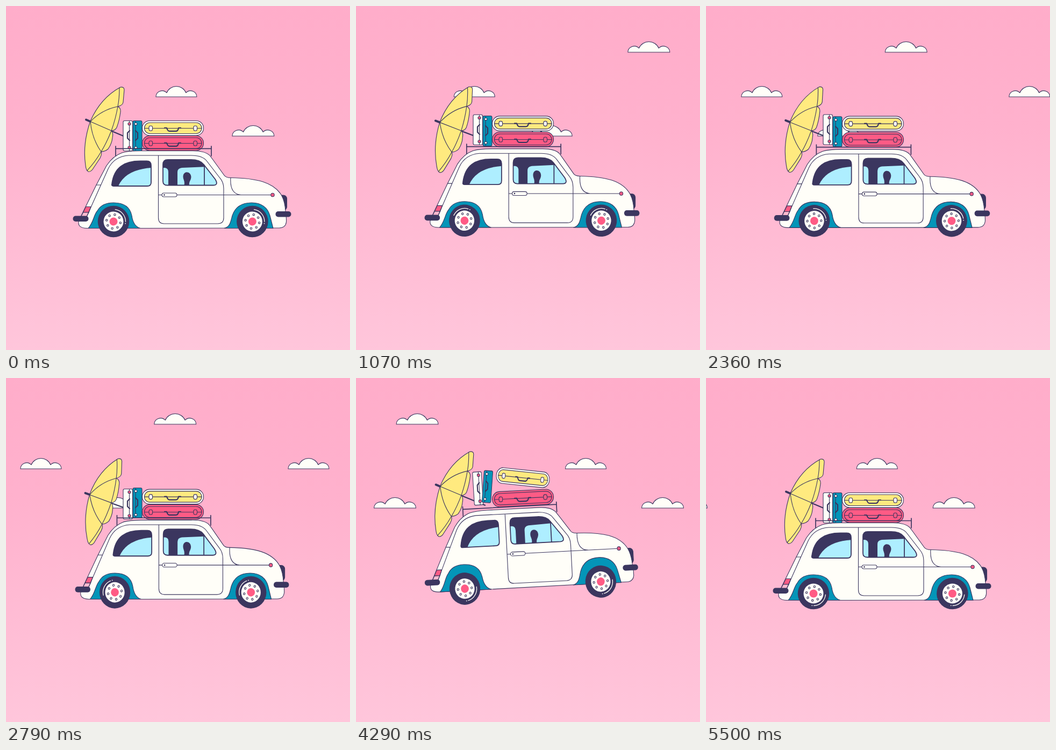
Recreate the animation shown at these times as an HTML page. Size 640 px wide and 640 px high, loop 5570 ms.

```html
<!DOCTYPE html>
<html lang="en">
<head>
<meta charset="utf-8">
<title>Road trip</title>
<style>
html, body { margin: 0; width: 100%; height: 100%; overflow: hidden; background: #ffb9d2; }
svg { display: block; width: 100%; height: 100%; }
.ln { stroke: #3b365f; stroke-width: 1.1; stroke-linejoin: round; stroke-linecap: round; }
.no { fill: none; }
.thick { stroke-width: 2.2; }
.navy { fill: #3b365f; }
.white { fill: #fffef8; }
.yellow { fill: #ffea7f; }
.red { fill: #ff5b85; }
.blue { fill: #0495b8; }
.glass { fill: #aeeeff; }
</style>
</head>
<body>
<svg viewBox="0 0 640 640">
  <defs>
    <linearGradient id="sky" x2="0" y2="1">
      <stop stop-color="#ffadca"/><stop offset=".35" stop-color="#ffb1cd"/><stop offset="1" stop-color="#ffc6db"/>
    </linearGradient>
    <path id="cloud" class="ln white" d="M0 19A11.5 11.5 0 0 1 20 11.500A19.500 19.500 0 0 1 56 11.500A11.500 11.500 0 0 1 76 19Z"/>
    <g id="wheelShape">
      <circle r="29.300" class="navy"/>
      <circle r="18.500" class="white"/>
      <circle r="7.500" class="red"/>
      <g id="bolts"></g>
      <path d="M3 -22.300A22.500 22.500 0 0 1 22.500 0" fill="none" stroke="#fffef8" stroke-width="1.300" stroke-linecap="round"/>
      <circle cx="22.200" cy="3.400" r=".9" class="white"/>
    </g>
    <clipPath id="rearGlass"><path d="M197 331C201 300 220 288.500 250 288.500H262Q270 288.500 270 297V328Q270 335 263 335H200Q196 335 197 331Z"/></clipPath>
    <clipPath id="sideGlass"><path d="M292 295Q292 286 301 286H344Q361 286 368 295L389 322Q396 333 386 333.500H300Q292 333.500 292 326Z"/></clipPath>
  </defs>
  <rect width="640" height="640" fill="url(#sky)"/>
  <g id="clouds"></g>

  <g id="umbrella" class="ln no">
    <path class="thick" d="M195 232L240 251"/>
    <path class="yellow" d="M213 151Q220 150 220 156L218 179Q217 185 208 187Q214 190 213 197Q211 213 206 226Q203 232 196 232Q200 236 198 245Q197 256 190 266Q184 271 177 271Q179 275 175 283L161 304Q157 309 153 308Q149 306 148 297Q142 257 157 214Q176 171 213 151Z"/>
    <path d="M211 152Q211 172 208 187Q204 210 196 232Q188 253 177 271Q166 290 151 306M157 215Q178 193 208 187M157 215L196 232M157 215Q160 247 177 271"/>
    <path stroke-width="4" d="M149 211.500L156 214.500"/>
  </g>

  <g id="white" class="ln">
    <rect class="white" x="218" y="213.500" width="17.500" height="56" rx="2.500"/>
    <path class="no" d="M229.500 214V269"/>
    <path class="no thick" d="M230 232L226 236V246L230 250"/>
    <rect class="red" x="227" y="217" width="5" height="4.500" rx="2"/>
    <rect class="red" x="227" y="261" width="5" height="4.500" rx="2"/>
  </g>
  <g id="blue" class="ln">
    <rect class="blue" x="236" y="213.500" width="17" height="56" rx="2.500"/>
    <path class="no" d="M241 214V269"/>
    <path class="no thick" d="M241 232L245 236V246L241 250"/>
    <rect class="white" x="239" y="217.500" width="5" height="4" rx="2"/>
    <rect class="white" x="239" y="261.500" width="5" height="4" rx="2"/>
  </g>
  <g id="red" class="ln"></g>
  <g id="yellow" class="ln"></g>

  <g id="car" class="ln">
    <path class="no" stroke-width="1.700" d="M204 261V279M382 261V279M204 265.500H382"/>
    <rect class="navy" x="507" y="352" width="15.500" height="28" rx="6.500"/>
    <path class="white" d="M150 413.500Q134 413 135 402Q136 396 140 390L168 333L187 297Q199 279 216 273Q228 269.500 250 269.500H345Q370 269 379 278L385 286L406 315Q409 319.500 418 319.500Q455 320 478 327Q503 335 513 353Q519 364 520 382Q522 392 521.500 402Q520 413 508 413L250 413.500Z"/>
    <path class="blue" d="M153 413.500C163 402 163 389 170 381C176 370 187 366 200 366C220 366 231 375 234 390C236 404 241 411 250 413.500Z"/>
    <path class="blue" d="M406 413.500C417 411 418 401 421 390C427 372 441 366 457 366C475 366 487 375 491 390L497 413.500Z"/>
    <path class="red" d="M148.500 373.500H158L154 384H143.500Z"/>
    <path fill="#ffb9cf" d="M143.500 384H154L150 392H139.500Z"/>
    <path class="no" d="M168 333H176.500M150 392L176.500 333L190 303Q201 280 228 278H345Q366 278 374 289L398 320Q405 328 405 340V394Q405 405 394 405H294Q283.500 405 283.500 394V278M283.500 351.500H494M418 319.500Q416 350 437 351.500"/>
    <g clip-path="url(#rearGlass)" stroke="none">
      <path class="navy" d="M190 280H280V340H190Z"/>
      <path class="glass" d="M207 340Q219 304 272 301V340Z"/>
    </g>
    <path class="no" stroke-width="1.800" d="M197 331C201 300 220 288.500 250 288.500H262Q270 288.500 270 297V328Q270 335 263 335H200Q196 335 197 331Z"/>
    <g clip-path="url(#sideGlass)" stroke="none">
      <path class="navy" d="M290 280H400V340H290Z"/>
      <path class="glass" d="M290 301H296Q302 302 302 309V340H290ZM319 340V309Q319 302 327 301L375 299L400 330V340Z"/>
      <path class="navy" d="M331 335C334 326 329 323 329.500 317C330 306 344 307 344.500 318C344 326 340 325 341 335Z"/>
    </g>
    <path class="no" stroke-width="1.800" d="M292 295Q292 286 301 286H344Q361 286 368 295L389 322Q396 333 386 333.500H300Q292 333.500 292 326ZM369 296V333"/>
    <rect class="white" x="290" y="348" width="28" height="7" rx="3.500"/>
    <circle class="navy" cx="294.500" cy="351.500" r=".8"/>
    <circle class="red" cx="496" cy="351.500" r="3.200"/>
    <g stroke="none">
      <g class="wheel"><use href="#wheelShape"/></g>
      <g class="wheel"><use href="#wheelShape"/></g>
      <rect class="navy" x="124.500" y="390.500" width="29" height="10.500" rx="5"/>
      <rect class="navy" x="501.500" y="382" width="29" height="10.500" rx="5"/>
    </g>
  </g>
</svg>
<script>
const LOOP = 5570, BOUNCE = 619;
const $ = id => document.getElementById(id);
const rad = Math.PI / 180;

// Value at time t on a line through [time, value, time, value, ...]
function track(t, keys) {
  if (t <= keys[0]) return keys[1];
  for (let i = 2; i < keys.length; i += 2) {
    if (t <= keys[i]) {
      const p = (t - keys[i - 2]) / (keys[i] - keys[i - 2]);
      return keys[i - 1] + (keys[i + 1] - keys[i - 1]) * p;
    }
  }
  return keys[keys.length - 1];
}

function pose(el, cx, cy, dx, dy, angle = 0, sx = 1, sy = 1) {
  el.setAttribute("transform",
    `translate(${cx + dx} ${cy + dy}) rotate(${angle}) scale(${sx} ${sy}) translate(${-cx} ${-cy})`);
}

function flatCase(id, y, shell) {
  const lock = x => `<rect class="${shell}" x="${x}" y="${y + 9.5}" width="6.5" height="9" rx="2.8"/>`;
  $(id).innerHTML =
    `<rect class="${shell}" x="253.5" y="${y}" width="114" height="27.5" rx="13.7"/>
     <rect class="${id}" x="257.500" y="${y + 3.5}" width="106.500" height="20.500" rx="10.2"/>
     <path class="no" d="M257.500 ${y + 14}H364"/>
     <path class="no thick" d="M295 ${y + 13.5}h4q2 6 5 6h12q4 0 5 -6h4"/>` + lock(266) + lock(349);
}
flatCase("yellow", 213.5, "white");
flatCase("red", 241.5, "red");

for (let i = 0; i < 8; i++) {
  const a = (i * 45 + 10) * rad;
  $("bolts").innerHTML +=
    `<circle class="ln white" cx="${13 * Math.cos(a)}" cy="${13 * Math.sin(a)}" r="1.700"/>`;
}

// x and y at the start, width scale, speed in px per ms
const clouds = [[279, 150, 1, .0903], [777, 150, 1, .0903],
  [421, 223, 1.025, .0903], [919, 223, 1.025, .0903], [649.2, 67, 1.025, .1338]];
$("clouds").innerHTML = clouds.map(() => '<use href="#cloud"/>').join("");

// centre, hop height, hop lag, jump height, early share of the jump, tilt, stretch x and y
const cases = [
  { id: "yellow", x: 310.5, y: 227, hop: 6, lag: .45, jump: 15, early: .05, tilt: 6, sx: -.13, sy: .06 },
  { id: "red", x: 310.5, y: 255, hop: 4, lag: .45, jump: 5, early: 0, tilt: -2.9, sx: 0, sy: .03 },
  { id: "white", x: 226.7, y: 241.5, hop: 9.5, lag: .45, jump: 13.5, early: .05, tilt: -3.5, sx: -.06, sy: .1 },
  { id: "blue", x: 244.5, y: 241.5, hop: 5, lag: .25, jump: 16, early: .44, tilt: 4, sx: -.05, sy: .06 }
];
const wheels = document.querySelectorAll(".wheel");

function draw(t) {
  clouds.forEach(([x, y, size, speed], i) =>
    $("clouds").children[i].setAttribute("transform", `translate(${x - speed * t} ${y}) scale(${size} 1)`));

  const bouncing = t < 5 * BOUNCE;
  const stretch = bouncing ? Math.abs(Math.sin(Math.PI * t / BOUNCE))
    : track(t, [3095, 0, 3500, .6, 4290, 1, 4570, .6, 4690, -1, 4900, .3, 5140, 0]);
  const lift = track(t, [3095, 0, 3300, -3, 3430, -9, 3500, -13, 3900, -21, 4290, -22.5,
    4570, -12, 4690, 3, 4850, 1, 5140, 0]) - 2 * stretch;
  const angle = track(t, [3200, 0, 3500, -1.35, 3900, -2.6, 4290, -3, 4570, -1.2, 4690, 0]);
  const drop = track(t, [3300, 0, 3500, 3, 4290, 9, 4570, 5, 4690, 0]);
  pose($("car"), 327, 413.5, 0, lift, angle, 1 - .02 * stretch, 1 + .022 * stretch);
  wheels.forEach((w, i) => w.setAttribute("transform",
    `translate(${i ? 458.4 : 200} ${401 + drop}) rotate(${.605 * t})`));

  const sway = bouncing ? -3 * stretch
    : track(t, [3095, 0, 3500, -4, 4290, -.8, 4640, 2, 4820, -2, 5140, 0]);
  const rise = bouncing ? -stretch
    : track(t, [3095, 0, 3300, -2, 3500, -7.5, 4290, -14, 4570, -7, 4690, 3, 4850, 1, 5140, 0]);
  pose($("umbrella"), 217, 241, 0, rise, sway);

  const shake = track(t, [0, 0, 300, 1, 2950, 1, 3200, 0]);
  for (const c of cases) {
    const j = track(t, [3200, 0, 3500, c.early, 4290, 1, 4600, .5, 4760, 0, 4900, .12, 5050, 0]);
    const roof = lift - 3.3 * stretch + (c.x - 327) * Math.sin(angle * rad);
    const hop = shake * c.hop * Math.abs(Math.sin(Math.PI * (t / BOUNCE - c.lag)));
    pose($(c.id), c.x, c.y, 0, roof - hop - c.jump * j, c.tilt * j, 1 + c.sx * j, 1 + c.sy * j);
  }
}

const start = performance.now();
function tick() {
  draw((performance.now() - start) % LOOP);
  requestAnimationFrame(tick);
}
tick();
</script>
</body>
</html>
```
